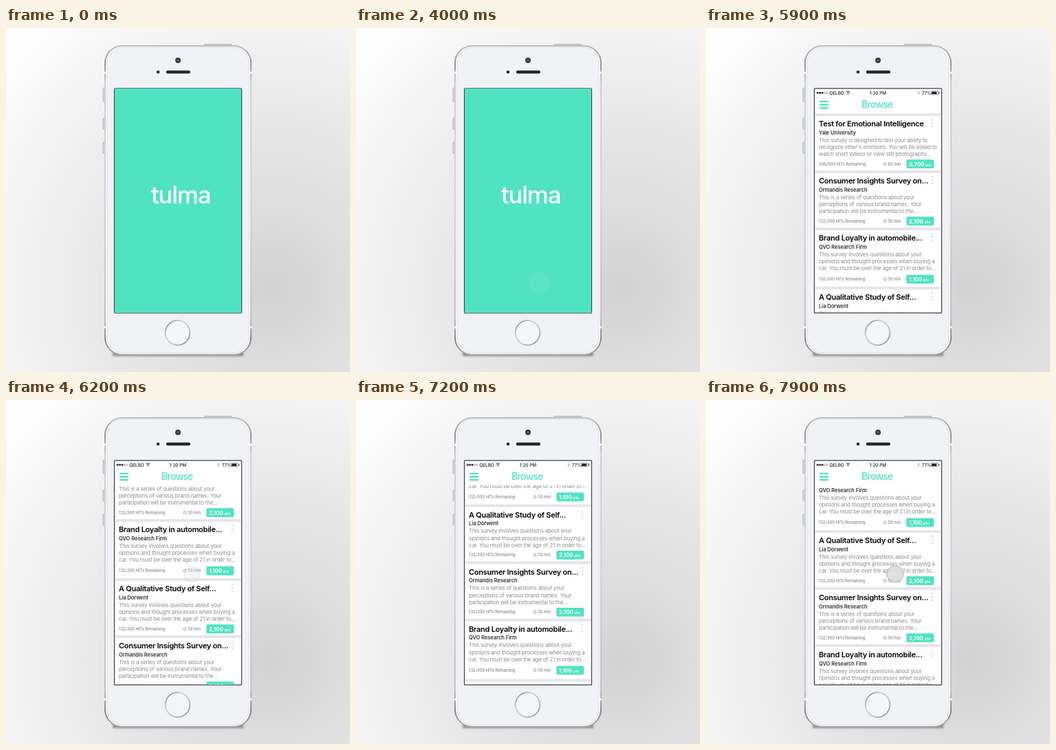
An HTML page for the animation above (8000 ms loop, 500 by 500 pixels).

```html
<!DOCTYPE html>
<html lang="en">
<head>
<meta charset="utf-8">
<title>Survey app</title>
<style>
  html, body { margin: 0; width: 100%; height: 100%; overflow: hidden; }
  svg { display: block; width: 100vw; height: 100vh; font-family: Inter, Roboto, sans-serif; }
  .logo { font-size: 35px; font-weight: 500; letter-spacing: -1.2px; fill: #fff; }
  .status { font-size: 6.4px; font-weight: 500; fill: #222; }
  .heading { font-size: 14px; font-weight: 500; letter-spacing: -.75px; fill: #50e3c2; }
  .title { font-size: 11px; font-weight: 600; letter-spacing: -.26px; fill: #050505; }
  .author { font-size: 7.5px; font-weight: 600; letter-spacing: -.03px; fill: #303030; }
  .body { font-size: 7.9px; letter-spacing: -.18px; fill: #8d8d8d; }
  .meta { font-size: 5.8px; font-weight: 500; fill: #858585; }
  .points { font-size: 8.2px; font-weight: 600; letter-spacing: -.1px; fill: #fff; }
  .unit { font-size: 5.4px; letter-spacing: 0; }
</style>
</head>
<body>
<svg viewBox="0 0 500 500" xmlns="http://www.w3.org/2000/svg">
  <defs>
    <radialGradient id="backdrop" gradientUnits="userSpaceOnUse" cx="385" cy="378" r="500">
      <stop offset="0" stop-color="#d2d2d3"/>
      <stop offset=".2" stop-color="#dcdcdd"/>
      <stop offset=".5" stop-color="#e8e8e9"/>
      <stop offset=".8" stop-color="#f5f5f5"/>
      <stop offset="1" stop-color="#fdfdfd"/>
    </radialGradient>
    <linearGradient id="rim" x2="0" y2="1">
      <stop offset="0" stop-color="#b4b6b9"/>
      <stop offset=".06" stop-color="#85878a"/>
      <stop offset=".12" stop-color="#c6c8cb"/>
      <stop offset=".5" stop-color="#cdcfd2"/>
      <stop offset=".88" stop-color="#b9bbbe"/>
      <stop offset=".95" stop-color="#77797c"/>
      <stop offset="1" stop-color="#a3a5a8"/>
    </linearGradient>
    <linearGradient id="ring" x2="1" y2="1">
      <stop offset="0" stop-color="#77797c"/>
      <stop offset=".35" stop-color="#d2d3d5"/>
      <stop offset=".65" stop-color="#bcbdc0"/>
      <stop offset="1" stop-color="#85878a"/>
    </linearGradient>
    <filter id="blur" x="-20%" y="-200%" width="140%" height="500%"><feGaussianBlur stdDeviation="1.5"/></filter>
    <clipPath id="screen"><rect x="158" y="88" width="184" height="326"/></clipPath>
    <clipPath id="listArea"><rect x="158" y="124" width="184" height="290"/></clipPath>
  </defs>

  <rect width="500" height="500" fill="url(#backdrop)"/>

  <g id="phone">
    <rect x="155" y="471" width="190" height="6" fill="#555" opacity=".6" filter="url(#blur)"/>
    <g fill="#d3d5d8" stroke="#989a9d" stroke-width=".6">
      <rect x="141" y="87" width="4" height="20" rx="1"/>
      <rect x="141" y="131" width="4" height="16" rx="1"/>
      <rect x="141" y="166" width="4" height="16" rx="1"/>
      <rect x="288" y="23.5" width="40" height="4" rx="1"/>
    </g>
    <rect x="144" y="25.8" width="212" height="449.2" rx="25" fill="#fbfbfc" stroke="url(#rim)" stroke-width="1.8"/>
    <rect x="146.8" y="28" width="206.4" height="444.5" rx="23" fill="#f1f2f5" stroke="#d9dadd" stroke-width=".8"/>
    <path d="M143 65h4M353 65h4M143 435h4M353 435h4" stroke="#fff" stroke-width="3"/>
    <circle cx="250" cy="47" r="4" fill="#343940"/>
    <circle cx="250" cy="47" r="1.8" fill="#4c6b86"/>
    <circle cx="221" cy="64" r="2.3" fill="#2b2d31"/>
    <rect x="232.7" y="61.8" width="35.3" height="4.4" rx="2.2" fill="#26282b"/>
    <circle cx="249.5" cy="443" r="17.8" fill="#f5f6f8" stroke="url(#ring)" stroke-width="1.8"/>
    <rect x="157.5" y="87.8" width="185" height="326.4" rx="1" fill="#fff" stroke="#3c4143" stroke-width="1.2"/>
  </g>

  <g clip-path="url(#screen)">
    <g id="browse">
      <g clip-path="url(#listArea)"><g id="list"></g></g>
      <g class="status">
        <g id="signal"></g>
        <text x="179.3" y="96.5">QELBO</text>
        <path d="M203.6 92.9q2.8-2.4 5.6 0M204.7 94.4q1.7-1.5 3.4 0" fill="none" stroke="#222" stroke-width=".9"/>
        <circle cx="206.4" cy="95.8" r=".8"/>
        <text x="250" y="96.5" text-anchor="middle">1:20 PM</text>
        <path d="M307.3 92.5l3 3-1.5 1.4v-5.4l1.5 1.4-3 3" fill="none" stroke="#999" stroke-width=".5"/>
        <text x="313.7" y="96.5">77%</text>
        <rect x="327.3" y="91.8" width="10.5" height="5" rx="1" fill="none" stroke="#222" stroke-width=".5"/>
        <rect x="328.1" y="92.6" width="7.2" height="3.4"/>
        <rect x="338.3" y="93.2" width="1" height="2.2"/>
      </g>
      <path d="M165 106.8h13M165 111.5h13M165 116.2h13" stroke="#50e3c2" stroke-width="2.3"/>
      <text class="heading" x="248.8" y="116" text-anchor="middle">Browse</text>
    </g>
    <g id="splash">
      <rect x="157" y="87" width="186" height="328" fill="#50e3c2"/>
      <text class="logo" x="254" y="255" text-anchor="middle">tulma</text>
    </g>
    <circle id="touch" fill="#dcdfdf" stroke="#a5adab" stroke-width="1"/>
  </g>
</svg>

<script>
const LOOP = 8000, STEP = 100;
const $ = id => document.getElementById(id);
const clamp = v => Math.max(0, Math.min(1, v));

const opinions = ['This survey involves questions about your',
  'opinions and thought processes when buying a',
  'car. You must be over the age of 21 in order to...'];
const emotional = { title: 'Test for Emotional Intelligence', author: 'Yale University',
  body: ['This survey is designed to test your ability to',
    "recognize other's emotions. You will be asked to",
    'watch short videos or view still photographs...'],
  left: '246/500', mins: 60, points: '3,700', metaY: 58.5 };
const consumer = { title: 'Consumer Insights Survey on...', author: 'Ormandis Research',
  body: ['This is a series of questions about your',
    'perceptions of various brand names. Your',
    'participation will be instrumental to the...'],
  left: '132/300', mins: 50, points: '2,100', metaY: 58.5 };
const brand = { title: 'Brand Loyalty in automobile...', author: 'QVO Research Firm',
  body: opinions, left: '132/300', mins: 50, points: '1,100', metaY: 60 };
const study = { title: 'A Qualitative Study of Self...', author: 'Lia Dorwent',
  body: opinions, left: '132/300', mins: 50, points: '2,100', metaY: 58.5 };

// y is the vertical middle of the card's title
function card(c, y) {
  const text = (cls, x, dy, s) => `<text class="${cls}" x="${x}" y="${y + dy}">${s}</text>`;
  const m = c.metaY, cy = y + m;
  return `<rect x="158" y="${y - 15}" width="184" height="4" fill="#e5e6ea"/>`
    + text('title', 164, 4, c.title)
    + [-5, 0, 5].map(d => `<circle cx="329" cy="${y - 1 + d}" r=".9" fill="#c4c4c4"/>`).join('')
    + text('author', 164, 15.7, c.author)
    + c.body.map((line, i) => text('body', 164, 26.8 + i * 10.3, line)).join('')
    + text('meta', 164, m + 2.3, c.left + ' HITs Remaining')
    + `<circle cx="260" cy="${cy + .2}" r="2.2" fill="none" stroke="#858585" stroke-width=".6"/>`
    + `<path d="M260 ${cy - 1.3}v1.5h1.3" fill="none" stroke="#858585" stroke-width=".5"/>`
    + text('meta', 264.3, m + 2.3, c.mins + ' min')
    + `<rect x="291.3" y="${cy - 6.2}" width="40" height="12.8" rx="2" fill="#50e3c2"/>`
    + text('points', 295, m + 3.1, `${c.points}<tspan class="unit" dx="2">pts</tspan>`);
}

const cards = [[emotional, 139], [consumer, 222], [brand, 305], [study, 391],
  [consumer, 474], [brand, 557], [study, 645]];
$('list').innerHTML = cards.map(([c, y]) => card(c, y)).join('');
$('signal').innerHTML = [0, 1, 2, 3, 4].map(i =>
  `<circle cx="${162.2 + i * 3.4}" cy="94.2" r="1.25" stroke="#222" stroke-width=".35" fill="${i < 3 ? '#222' : 'none'}"/>`).join('');

const flick = (t, start) => 1 - (1 - clamp((t - start) / 800) ** 1.15) ** 3;
const pull = t => clamp((t - 7700) / 200) ** 1.3;
const scrollAt = t => 169.3 * flick(t, 5900) + 66 * flick(t, 6800) - 48.3 * pull(t);

// Returns [x, y, radius, opacity]
function touchAt(t) {
  if (t >= 1200 && t < 4000) return t < 1300 ? [261, 292, 15, .4] : [261, 293.5, 11.5, .95];
  if (t >= 4000 && t < 4100) return [266, 370, 16, .1];
  if (t >= 6000 && t < 6300) return [270, 370 - scrollAt(t), 11.5, t < 6200 ? .9 : .3];
  if (t >= 6800 && t < 7100) return [270, 330 - scrollAt(t) + 169, 11.5, t < 7000 ? .9 : .3];
  if (t >= 7700) return [275, 204.7 + 48.3 * pull(t), t < 7800 ? 14 : 12, t < 7800 ? .5 : .92];
  return [0, 0, 0, 0];
}

function draw(t) {
  const [x, y, r, opacity] = touchAt(t);
  const touch = $('touch');
  touch.setAttribute('cx', x);
  touch.setAttribute('cy', y);
  touch.setAttribute('r', r);
  touch.setAttribute('opacity', opacity);
  $('splash').setAttribute('opacity', 1 - clamp((t - 4000) / 600));
  $('list').setAttribute('transform', `translate(0 ${-scrollAt(t)})`);
}

const origin = performance.now();
function tick() {
  const t = (performance.now() - origin) % LOOP;
  draw(Math.floor(t / STEP) * STEP);
  requestAnimationFrame(tick);
}
tick();
</script>
</body>
</html>
```
